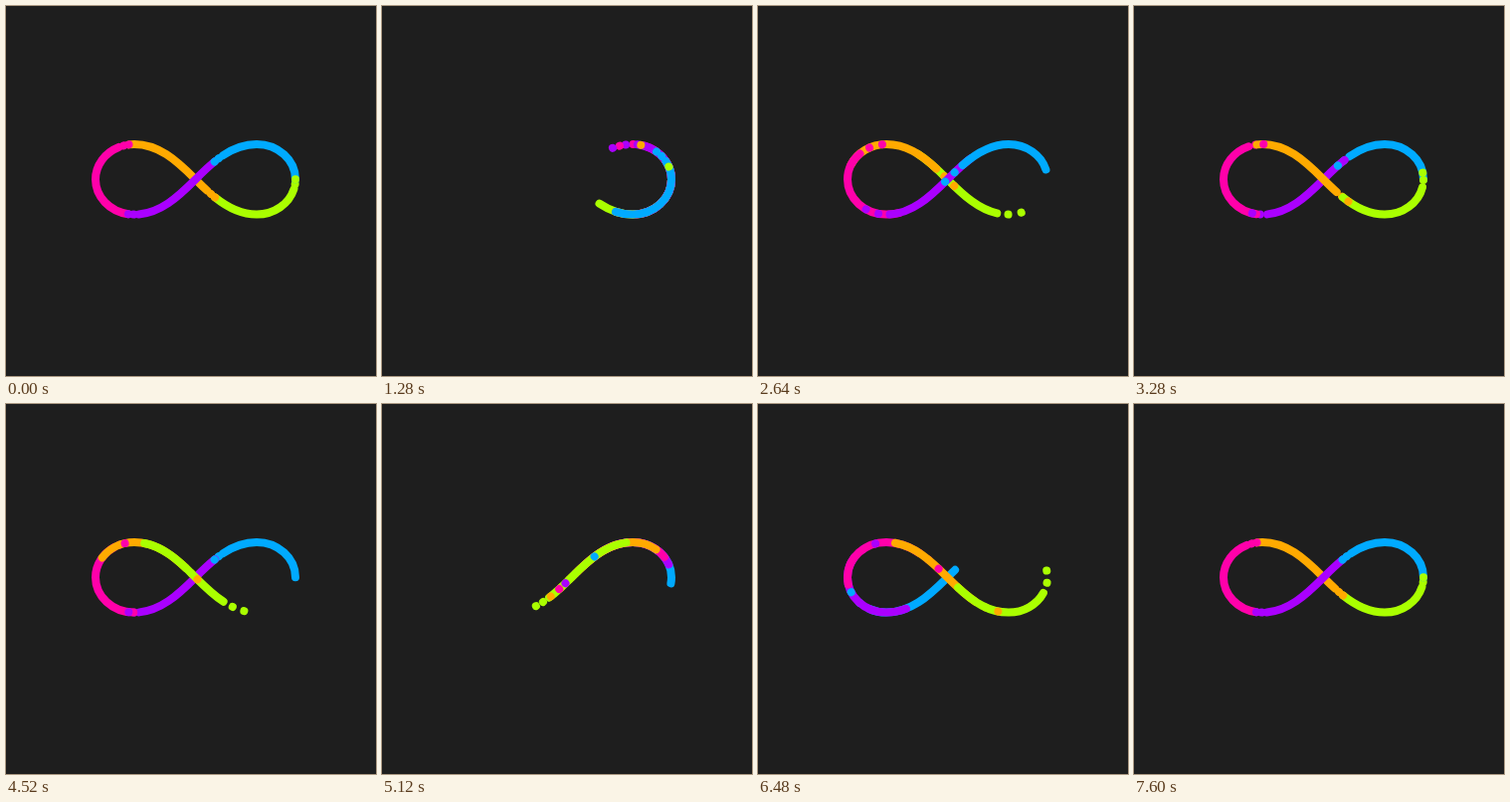
Recreate the animation shown at these times as an HTML page with a canvas. Size 372 by 372 pixels, loop 8000 ms.

```html
<!DOCTYPE html>
<html>
<head>
<meta charset="utf-8">
<style>
html, body { margin: 0; width: 100%; height: 100%; overflow: hidden; background: #1e1e1e; }
canvas { display: block; }
</style>
</head>
<body>
<canvas width="372" height="372"></canvas>
<script>
const ctx = document.querySelector('canvas').getContext('2d');
const outline = 'M291 174.3C291 154.8 273.5 139 252 139C228 139 210.5 154.3 190.5 174.3' +
  'C170.5 194.3 153 209.6 129 209.6C107.5 209.6 90 193.8 90 174.3' +
  'C90 154.8 107.5 139 129 139C153 139 170.5 154.3 190.5 174.3' +
  'C210.5 194.3 228 209.6 252 209.6C273.5 209.6 291 193.8 291 174.3Z';
const loop = new Path2D(outline);
const ruler = document.createElementNS('http://www.w3.org/2000/svg', 'path');
ruler.setAttribute('d', outline);
const total = ruler.getTotalLength();

const colors = ['#00aaff', '#aa00ff', '#ff00aa', '#ffaa00', '#aaff00'];
const HALF = 4000, MOVE = 3600, SWAP = 2700;

// Laps travelled over time, by starting rank
const times = [0, 520, 1280, 1680, 2080, 2600, 3280, 3600];
const laps = [
  [0, .17, .855, 1.462, 2.03, 2.02, 2, 2],
  [0, .06, .71, 1.252, 1.765, 1.99, 1.995, 2],
  [0, .01, .496, .978, 1.512, 1.96, 2, 2],
  [0, .001, .255, .707, 1.31, 1.92, 2, 2],
  [0, 0, .02, .49, 1.147, 1.86, 2, 2]
];

function travel(row, t) {
  const rise = i => (row[i + 1] - row[i]) / (times[i + 1] - times[i]);
  const slope = i => {
    if (i === 0 || i === times.length - 1) return 0;
    const a = rise(i - 1), b = rise(i);
    return a * b > 0 ? 2 * a * b / (a + b) : 0;
  };
  let i = 0;
  while (i < times.length - 2 && t >= times[i + 1]) i++;
  const h = times[i + 1] - times[i], u = (t - times[i]) / h, v = 1 - u;
  return v * v * (1 + 2 * u) * row[i] + u * u * (3 - 2 * u) * row[i + 1] +
    h * u * v * (v * slope(i) - u * slope(i + 1));
}

function dash(color, start, length) {
  const from = ((start % 1) + 1) % 1;
  ctx.strokeStyle = color;
  ctx.setLineDash([length * total, (1 - length) * total]);
  ctx.lineDashOffset = -from * total;
  ctx.stroke(loop);
}
const dot = (color, at) => dash(color, at, .0001);

function draw(time) {
  const back = time >= HALF;
  const t = Math.min(time % HALF, MOVE);
  const bands = colors.map((color, i) => {
    const rank = back ? 4 - i : i;
    const d = travel(laps[rank], t);
    const stretch = .04 * Math.min(1, 6 * d) * Math.min(1, (MOVE - t) / 1000) *
      (rank ? 1 : Math.abs(Math.cos(Math.PI * t / 2900)));
    return { color, start: i / 5 + (back ? -d : d), stretch };
  });
  // Stacking flips late in each sweep
  if (back === (t >= SWAP)) bands.reverse();

  ctx.fillStyle = '#1e1e1e';
  ctx.fillRect(0, 0, 372, 372);
  ctx.lineWidth = 8;
  ctx.lineCap = 'round';
  for (const b of bands) {
    dash(b.color, b.start, .18 + .3 * b.stretch);
    dot(b.color, b.start + .19 + .6 * b.stretch);
  }
  for (const b of bands) dot(b.color, b.start + .2 + b.stretch);
}

function frame() {
  draw(Math.floor(performance.now() / 40) * 40 % (2 * HALF));
  requestAnimationFrame(frame);
}
frame();
</script>
</body>
</html>
```
